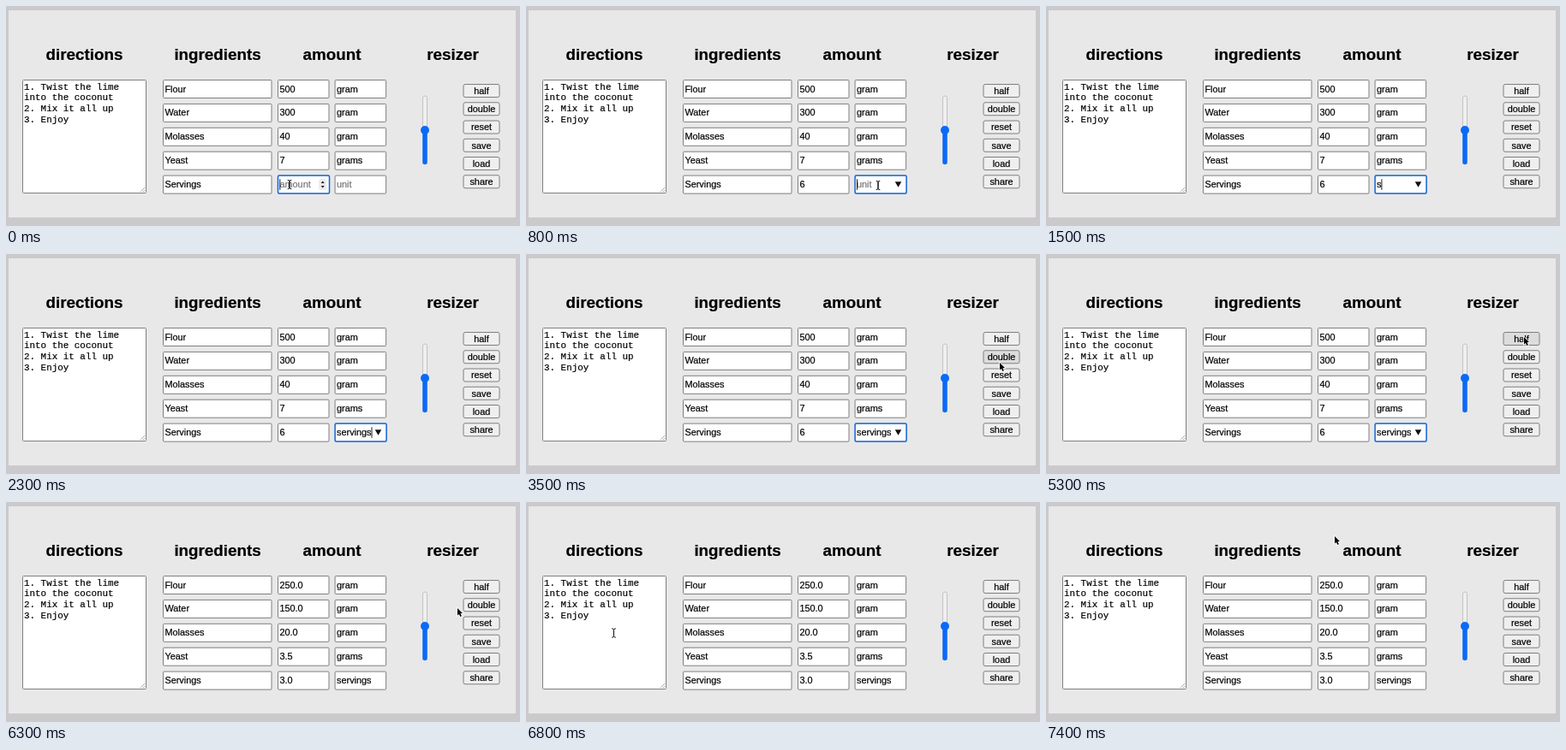
Write an HTML page with a canvas that moves like this. It is 600 px wide and 257 px high and loops after 8000 ms.

```html
<!DOCTYPE html>
<html lang="en">
<head>
<meta charset="utf-8">
<title>Recipe resizer</title>
<style>
  html, body { margin: 0; width: 100%; height: 100%; overflow: hidden; }
  canvas { display: block; width: 600px; height: 257px; }
</style>
</head>
<body>
<canvas></canvas>
<script>
const LOOP = 8000, STEP = 100;
const UNIT_FOCUS = 800, TYPING = 1500, TYPED = 2200, HALVED = 5500;
const SANS = '"Liberation Sans", Arial, sans-serif';
const MONO = '"Liberation Mono", "Courier New", monospace';
const BODY = '10.9px ' + SANS;
const BLUE = '#0a6af8', FOCUS = '#1263cf', BORDER = '#7f7f7f';

const directions = ['1. Twist the lime', 'into the coconut', '2. Mix it all up', '3. Enjoy'];
const headings = { directions: 91.5, ingredients: 247, amount: 380.5, resizer: 521.5 };
const rows = [
  ['Flour', 500, 'gram'], ['Water', 300, 'gram'], ['Molasses', 40, 'gram'],
  ['Yeast', 7, 'grams'], ['Servings', 6, '']
];
const columns = [
  { x: 183, w: 127, hint: '' }, { x: 317, w: 60, hint: 'amount' }, { x: 383.6, w: 60, hint: 'unit' }
];
const buttons = ['half', 'double', 'reset', 'save', 'load', 'share'];

// Pointer path: time, x, y
const path = [
  [0, 331, 208], [400, 331, 208], [800, 411, 209], [2700, 411, 209], [2900, 485, 146],
  [3200, 550, 208], [3500, 553, 127], [4000, 556, 104], [4800, 553, 122], [5300, 558, 97],
  [6200, 558, 97], [6300, 527, 124], [6700, 110, 225], [6900, 95, 80],
  [7100, 210, 205], [7400, 337, 40], [LOOP, 337, 40]
];

const canvas = document.querySelector('canvas');
const ratio = window.devicePixelRatio || 1;
canvas.width = 600 * ratio;
canvas.height = 257 * ratio;
const ctx = canvas.getContext('2d');
ctx.scale(ratio, ratio);

const rowTop = r => 86.5 + r * 27.9;
const buttonTop = i => 91.5 + i * 21.25;
const inside = (px, py, x, y, w, h) => px >= x && px <= x + w && py >= y && py <= y + h;

function pointerAt(t) {
  const i = path.findIndex(key => key[0] > t);
  const [t0, x0, y0] = path[i - 1], [t1, x1, y1] = path[i];
  const k = (t - t0) / (t1 - t0);
  return [x0 + (x1 - x0) * k, y0 + (y1 - y0) * k];
}

function typedUnit(t) {
  return 'servings'.slice(0, Math.max(0, Math.ceil((t - TYPING + 50) / 110)));
}

// The blink restarts with every focus change or key press
function caretVisible(t) {
  const lastAction = t < UNIT_FOCUS ? 0 : t < TYPING ? UNIT_FOCUS : Math.min(t, TYPED);
  return (t - lastAction) % 800 < 400;
}

function box(x, y, w, h, fill, stroke, radius = 1, line = 1) {
  ctx.beginPath();
  ctx.roundRect(x, y, w, h, radius);
  ctx.fillStyle = fill;
  ctx.fill();
  if (!stroke) return;
  ctx.strokeStyle = stroke;
  ctx.lineWidth = line;
  ctx.stroke();
}

function text(str, x, y, font = BODY, color = '#000', align = 'left') {
  ctx.font = font;
  ctx.textAlign = align;
  ctx.fillStyle = ctx.strokeStyle = color;
  ctx.lineWidth = 0.2;
  ctx.fillText(str, x, y);
  ctx.strokeText(str, x, y);
}

function polygon(points, fill, outline) {
  ctx.beginPath();
  points.forEach(([x, y]) => ctx.lineTo(x, y));
  ctx.closePath();
  if (outline) {
    ctx.strokeStyle = outline;
    ctx.lineWidth = 1.4;
    ctx.stroke();
  }
  ctx.fillStyle = fill;
  ctx.fill();
}

function triangle(x, y, halfWidth, height) {
  polygon([[x - halfWidth, y], [x + halfWidth, y], [x, y + height]], '#111');
}

function drawPage() {
  box(0, 0, 600, 257, '#cbc9cb', null, 0);
  box(3, 5, 592, 242, '#e8e8e8', null, 0);
  for (const label in headings) {
    text(label, headings[label], 63, 'bold 18.8px ' + SANS, '#000', 'center');
  }

  box(19.5, 86.5, 144, 132, '#fff', BORDER);
  directions.forEach((line, i) => text(line, 21, 97.7 + i * 12.6, '10.9px ' + MONO));
  ctx.strokeStyle = '#888';
  ctx.lineWidth = 0.7;
  ctx.beginPath();
  for (const d of [2, 5]) {
    ctx.moveTo(162 - d, 217);
    ctx.lineTo(162, 217 - d);
  }
  ctx.stroke();

  box(486.5, 105, 5, 80, '#efefef', '#b9b9b9', 2.5, 0.8);
  box(486.3, 145, 5.4, 40, BLUE, null, 2.5);
  box(484, 140, 10, 10, BLUE, null, 5);
}

function drawField({ x, w, hint }, y, value, active, t) {
  if (active) box(x + 0.5, y - 0.2, w, 21, '#fff', FOCUS, 1.5, 1.5);
  else box(x + 0.5, y, w - 0.5, 21, '#fff', BORDER);
  const left = x + 2.4;
  text(value || hint, left, y + 14, BODY, value ? '#000' : '#757575');
  if (active && caretVisible(t)) {
    const width = value ? ctx.measureText(value).width : 0;
    box(left + width, y + 4.2, 0.9, 12.5, '#000', null, 0);
  }
}

function drawFields(t) {
  const focus = t < UNIT_FOCUS ? 1 : t < HALVED ? 2 : -1;
  rows.forEach(([name, amount, unit], r) => {
    const last = r === rows.length - 1;
    const shown = t >= HALVED ? (amount / 2).toFixed(1) : last && t < 300 ? '' : String(amount);
    const values = [name, shown, unit || typedUnit(t)];
    columns.forEach((column, c) => drawField(column, rowTop(r), values[c], last && c === focus, t));
  });
  if (focus === 1) {
    box(365.2, 202, 9, 13, '#ececec', null, 2);
    triangle(369.7, 207, 2, -2.6);
    triangle(369.7, 210, 2, 2.6);
  }
  if (focus === 2) triangle(434.5, 205.3, 3.8, 6.5);
  if (t >= UNIT_FOCUS + STEP && t < TYPING) {
    box(386, 221, 59, 50, '#fff', '#c4c4c4', 2, 0.7);
    ['gram', 'grams'].forEach((option, i) => text(option, 389, 234 + i * 15));
  }
}

function drawButtons(t, px, py) {
  buttons.forEach((label, i) => {
    const y = buttonTop(i);
    const hover = inside(px, py, 534, y, 42, 15);
    const fill = !hover ? '#efefef' : t === HALVED ? '#f5f5f5' : '#dcdcdc';
    box(534, y, 42, 15, fill, BORDER, 2);
    text(label, 555, y + 11.3, BODY, '#000', 'center');
  });
}

function drawPointer(x, y) {
  const overText = inside(x, y, 19, 86, 145, 133) ||
    rows.some((row, r) => columns.some(c => inside(x, y, c.x, rowTop(r), c.w, 21)));
  if (overText) {
    ctx.beginPath();
    for (const side of [-1, 1]) {
      ctx.moveTo(x + side * 2.3, y - 4.7);
      ctx.quadraticCurveTo(x, y - 4.7, x, y - 3);
      ctx.lineTo(x, y + 4);
      ctx.quadraticCurveTo(x, y + 5.7, x + side * 2.3, y + 5.7);
    }
    ctx.strokeStyle = '#111';
    ctx.lineWidth = 1;
    ctx.stroke();
  } else {
    const shape = [[0, 0], [0, 8.6], [1.9, 6.9], [3.3, 10], [4.9, 9.3], [3.5, 6.3], [6, 6.1]];
    polygon(shape.map(([dx, dy]) => [x + dx, y + dy]), '#000', '#fff');
  }
}

function draw(now) {
  const t = Math.floor((now % LOOP) / STEP) * STEP;
  const [x, y] = pointerAt(t);
  drawPage();
  drawFields(t);
  drawButtons(t, x, y);
  const hiddenByTyping = t >= TYPING && t < 2800;
  if (!hiddenByTyping) drawPointer(x, y);
}

const start = performance.now();
function tick() {
  draw(performance.now() - start);
  requestAnimationFrame(tick);
}
tick();
</script>
</body>
</html>
```
